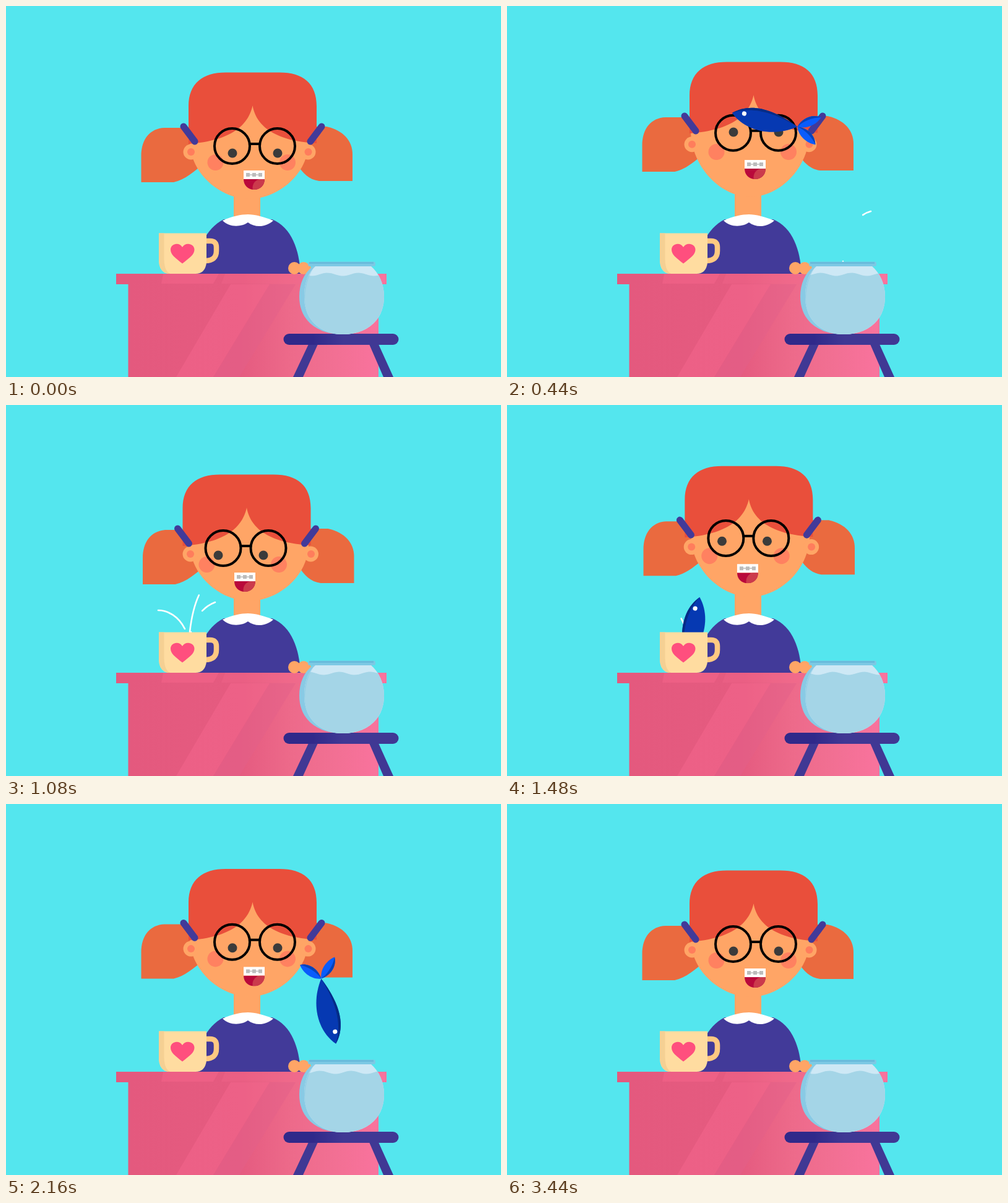
Recreate the animation shown at these times as an HTML page. Size 800 by 600 pixels, loop 3480 ms.

```html
<!DOCTYPE html>
<html lang="en">
<head>
<meta charset="utf-8">
<title>Jumping fish</title>
<style>
html, body { margin: 0; width: 100%; height: 100%; overflow: hidden; background: #54e6ee; }
svg { display: block; width: 100vw; height: 100vh; }
</style>
</head>
<body>
<svg viewBox="0 0 800 600">
  <defs>
    <linearGradient id="deskFill" gradientUnits="userSpaceOnUse" x1="198" y1="0" x2="602" y2="0">
      <stop offset="0" stop-color="#e4597e"/><stop offset=".45" stop-color="#e55b80"/>
      <stop offset=".65" stop-color="#ed6a8a"/><stop offset=".8" stop-color="#f16f92"/>
      <stop offset="1" stop-color="#f9739d"/>
    </linearGradient>
    <linearGradient id="seatFill" gradientUnits="userSpaceOnUse" x1="496" y1="0" x2="545" y2="0">
      <stop offset="0" stop-color="#30298a"/><stop offset="1" stop-color="#403894"/>
    </linearGradient>
    <clipPath id="air"><path d="M0 0H800V415H400V369H0Z"/></clipPath>
    <clipPath id="lips"><path d="M384 280H418C418 290 411 297 401 297S384 290 384 280Z"/></clipPath>
    <clipPath id="bowlIn"><path d="M501 420C487 432 482 450 482 470C482 510 510 531 545 531C581 531 611 510 611 470C611 450 603 432 589 420Z"/></clipPath>
  </defs>
  <rect width="800" height="600" fill="#54e6ee"/>

  <g id="tails" fill="#ea6a3f">
    <path d="M218.500 285V243C218.500 214 234 197 258 197H320V255C304 267 290 281 271 285Z"/>
    <path d="M470 195H518C545 201 560 218 560 240V283H506C490 281 479 270 470 255Z"/>
  </g>

  <path d="M368 295H411V350H368Z" fill="#ffa566"/>
  <path d="M306 433C308 395 322 360 352 345H430C462 358 474 395 476 433Z" fill="#423a99"/>
  <path d="M350 347C365 340 380 337 391 337C402 337 417 341 432 347C420 358 403 359 391 350C380 358 360 358 350 347Z" fill="#fff"/>

  <g fill="#ffa566">
    <path id="face"/>
    <g id="earL"><circle cx="299" cy="236" r="12.500"/><circle cx="299" cy="236" r="6" fill="#ff7d5c"/></g>
    <g id="earR"><circle cx="488" cy="236" r="12.500"/><circle cx="488.500" cy="236" r="6" fill="#ff7d5c"/></g>
  </g>
  <g id="cheeks" fill="#ff8160"><circle cx="338.500" cy="253" r="13"/><circle cx="455" cy="253" r="13"/></g>

  <g id="hair">
    <path d="M295 223V162C295 125 318 107.500 355 107.500H442C480 107.500 502 125 502 162V222C431 218 404 192 398.500 161C392 192 365 218 295 223Z" fill="#e94f3b"/>
    <path d="M287 195L305 219M510 195L492 219" stroke="#423a99" stroke-width="11" stroke-linecap="round"/>
  </g>

  <g id="mouth">
    <path d="M384 266H418V280H384Z" fill="#fff"/>
    <path d="M388 273H414" stroke="#bcbcbc" stroke-width="1.500"/>
    <path d="M388 270h6v6h-6zM398 270h6v6h-6zM408 270h6v6h-6z" fill="#bcbcbc"/>
    <g clip-path="url(#lips)">
      <rect x="384" y="280" width="34" height="18" fill="#b9093b"/>
      <circle cx="413" cy="294" r="14.500" fill="#cb3a4c"/>
    </g>
  </g>
  <g id="eyes" fill="#3b3b3b"><circle cx="366" cy="238" r="7.500"/><circle cx="439" cy="238" r="7.500"/></g>
  <g id="glasses" fill="none" stroke="#000" stroke-width="4">
    <circle cx="365.500" cy="226.500" r="28.500"/><circle cx="438.500" cy="226.500" r="28.500"/>
    <path d="M393 223H411"/>
  </g>

  <path d="M178 433H615V450H178ZM197.500 450H602V600H197.500Z" fill="url(#deskFill)"/>
  <path d="M363 450H426L335 600H275Z" fill="#f5668c" opacity=".55"/>
  <path d="M426 450H468L377 600H335Z" fill="#e4608a" opacity=".5"/>
  <path d="M254 433H344L335 449H251Z" fill="#f5668c" opacity=".45"/>
  <path d="M354 433H480L475 449H348Z" fill="#f5668c" opacity=".3"/>
  <g fill="#ffa566"><circle cx="466" cy="424" r="10"/><circle cx="481" cy="424" r="10"/><circle cx="487" cy="424" r="6"/></g>

  <g id="splashes" fill="none" stroke="#fff" stroke-width="2.600"/>

  <g clip-path="url(#air)">
    <g id="fish">
      <g id="fins"></g>
      <path d="M54 0C30 -21 -5 -22 -54 0C-20 24 25 26 54 0Z" fill="#0639b2"/>
      <path d="M54 0C30 -21 -5 -22 -54 0C-5 -17 28 -15 54 0Z" fill="#052c86"/>
      <circle cx="34.500" cy="-3" r="3.600" fill="#fff"/>
    </g>
  </g>

  <path d="M322 380H330Q340 380 340 390V396Q340 412 322 412" fill="none" stroke="#ffc982" stroke-width="8.500"/>
  <path d="M247 367.500H324V415Q322 433 306 433H265Q248 433 247 412Z" fill="#ffdca0"/>
  <path d="M247 367.500H255.500V410Q256 430 266 433Q248 433 247 412Z" fill="#f5d093"/>
  <path d="M285 416.500C273 407 266 402 266 394C266 384 280 381 285 390C290 381 304.500 384 304.500 394C304.500 402 297 407 285 416.500Z" fill="#ff4f7e"/>

  <g fill="#403894">
    <path d="M489 547H504L480 600H464ZM587 547H602L626 600H610Z"/>
    <rect x="448.500" y="530" width="186" height="18" rx="9" fill="url(#seatFill)"/>
  </g>

  <path d="M497 420C481 432 474 450 474 470C474 510 505 531 543 531C580 531 611 510 611 470C611 450 603 432 589 420Z" fill="#89cae5"/>
  <g clip-path="url(#bowlIn)">
    <rect x="474" y="418" width="140" height="115" fill="#cde8f5"/>
    <path id="water" fill="#a4d5e7"/>
    <path d="M474 418H501Q484 440 483 475Q485 520 520 531H474Z" fill="#89cae5" opacity=".55"/>
  </g>
  <rect x="488" y="413.500" width="109" height="7.500" rx="3" fill="#7cc9e4"/>
  <path d="M490 415.500H594" stroke="#66b8da" stroke-width="2.500"/>
</svg>
<script>
const LOOP = 3480;
const el = id => document.getElementById(id);
const clamp = (v, a = 0, b = 1) => Math.min(b, Math.max(a, v));
const ease = p => p < .5 ? 4 * p ** 3 : 1 - 4 * (1 - p) ** 3;
const move = (id, x, y) => el(id).setAttribute('transform', `translate(${x} ${y})`);

function track(keys, t) {
  let i = 0;
  while (i < keys.length - 2 && t >= keys[i + 1][0]) i++;
  const [t0, a] = keys[i], [t1, b] = keys[i + 1];
  return a + (b - a) * ease(clamp((t - t0) / (t1 - t0)));
}

const NOD = [[20, 0], [440, -17], [560, -17.2], [1040, 5], [1230, 5], [1690, -17.2], [1770, -17], [2360, 0]];
const TURN = [[560, 0], [1040, 1], [1240, 1], [1900, 0]];

const JUMPS = [
  { apex: 445, dir: -1 },
  { apex: 1775, dir: 1 }
];
const RISE = 330, FALL = 472;

const MUG = [297, 367], BOWL = [543, 413];
const MID = 'M0 0C4 -35 14 -75 40 -89';
const RIGHT = 'M2 0C6 -20 20 -40 41 -48';
const LEFT = 'M-8 -5C-18 -25 -35 -35 -51 -35';
const HIGH_LEFT = 'M-8 -5C-18 -35 -35 -46 -57 -43';
const BOWL_MID = 'M0 0C4 -40 18 -74 45 -81';
const BOWL_RIGHT = 'M8 0C20 -25 45 -42 70 -40';
// place, path, start, duration
const STRANDS = [
  [BOWL, BOWL_MID, 70, 400], [BOWL, LEFT, 60, 330], [BOWL, BOWL_RIGHT, 60, 330],
  [MUG, RIGHT, 888, 240], [MUG, LEFT, 960, 240], [MUG, MID, 1008, 240],
  [MUG, RIGHT, 1400, 330], [MUG, HIGH_LEFT, 1428, 400], [MUG, MID, 1470, 400],
  [BOWL, BOWL_RIGHT, 2190, 300], [BOWL, LEFT, 2230, 300], [BOWL, BOWL_MID, 2270, 300]
].map(([at, d, start, dur]) => {
  const node = document.createElementNS('http://www.w3.org/2000/svg', 'path');
  node.setAttribute('d', d);
  node.setAttribute('transform', `translate(${at})`);
  el('splashes').append(node);
  return { node, start, dur, len: node.getTotalLength() };
});

function drawHead(t) {
  const y = track(NOD, t), h = track(TURN, t), up = Math.min(y, 0);
  move('tails', 2.5 * h, y);
  move('hair', -9.5 * h, y);
  move('cheeks', -14 * h, y);
  move('mouth', -15 * h, y);
  move('glasses', -14.5 * h, y + up * .25);
  move('eyes', -23 * h, y + up);
  move('earL', -h, y - up * .28);
  move('earR', 4.5 * h, y - up * .28);
  const top = 222 + y, low = 312 + y - up * .82;
  const side = top + (low - top) * .59;
  el('face').setAttribute('d', `M310 ${top - 70}H476L489 ${top}C487 ${side} 437 ${low} 393 ${low}` +
    `C350 ${low} 300 ${side} 297 ${top}Z`);
}

function drawFish(t) {
  const { apex, dir } = JUMPS[t < 1200 ? 0 : 1];
  const u = (t - apex) / (t < apex ? RISE : FALL);
  el('fish').style.display = Math.abs(u) < 1.3 ? '' : 'none';
  const x = 415 + 130 * dir * clamp(u, -1, 1), y = 184 + 226 * u * u;
  const pitch = u < 0 ? 11 - 74 * u : Math.max(11 - 108 * u, -86);
  el('fish').setAttribute('transform', `translate(${x} ${y}) scale(${dir} 1) rotate(${-pitch})`);
  const spread = 33 + 14 * clamp(Math.abs(u));
  el('fins').innerHTML = [1, -1].map(s =>
    `<g transform="translate(-54 0) rotate(${s * spread})">
      <path d="M0 0C-12 -10 -30 -11 -41 0C-30 8 -12 10 0 0Z" fill="#0a5cfb"/>
      <path d="M0 0C-12 -10 -30 -11 -41 0C-28 -5 -12 -5 0 0Z" fill="#0743b8"/></g>`).join('');
}

function drawSplash(t) {
  for (const { node, start, dur, len } of STRANDS) {
    const p = (t - start) / dur;
    const head = clamp(p * 2), tail = clamp(p * 2 - 1);
    node.style.display = p > 0 && p < 1 ? '' : 'none';
    node.setAttribute('stroke-dasharray', `0 ${tail * len} ${(head - tail) * len} ${len * 2}`);
    node.setAttribute('stroke-linecap', 'round');
  }
}

function drawWater(t) {
  const phase = t / LOOP * Math.PI * 4;
  let d = 'M474 533';
  for (let x = 474; x <= 614; x += 4) {
    d += `L${x} ${434 + 2.5 * Math.sin((x - 532) / 50 * Math.PI * 2 + phase)}`;
  }
  el('water').setAttribute('d', d + 'V533Z');
}

function draw(t) {
  drawHead(t);
  drawFish(t);
  drawSplash(t);
  drawWater(t);
}

const begin = performance.now();
function tick() {
  draw((performance.now() - begin) % LOOP);
  requestAnimationFrame(tick);
}
draw(0);
requestAnimationFrame(tick);
</script>
</body>
</html>
```
